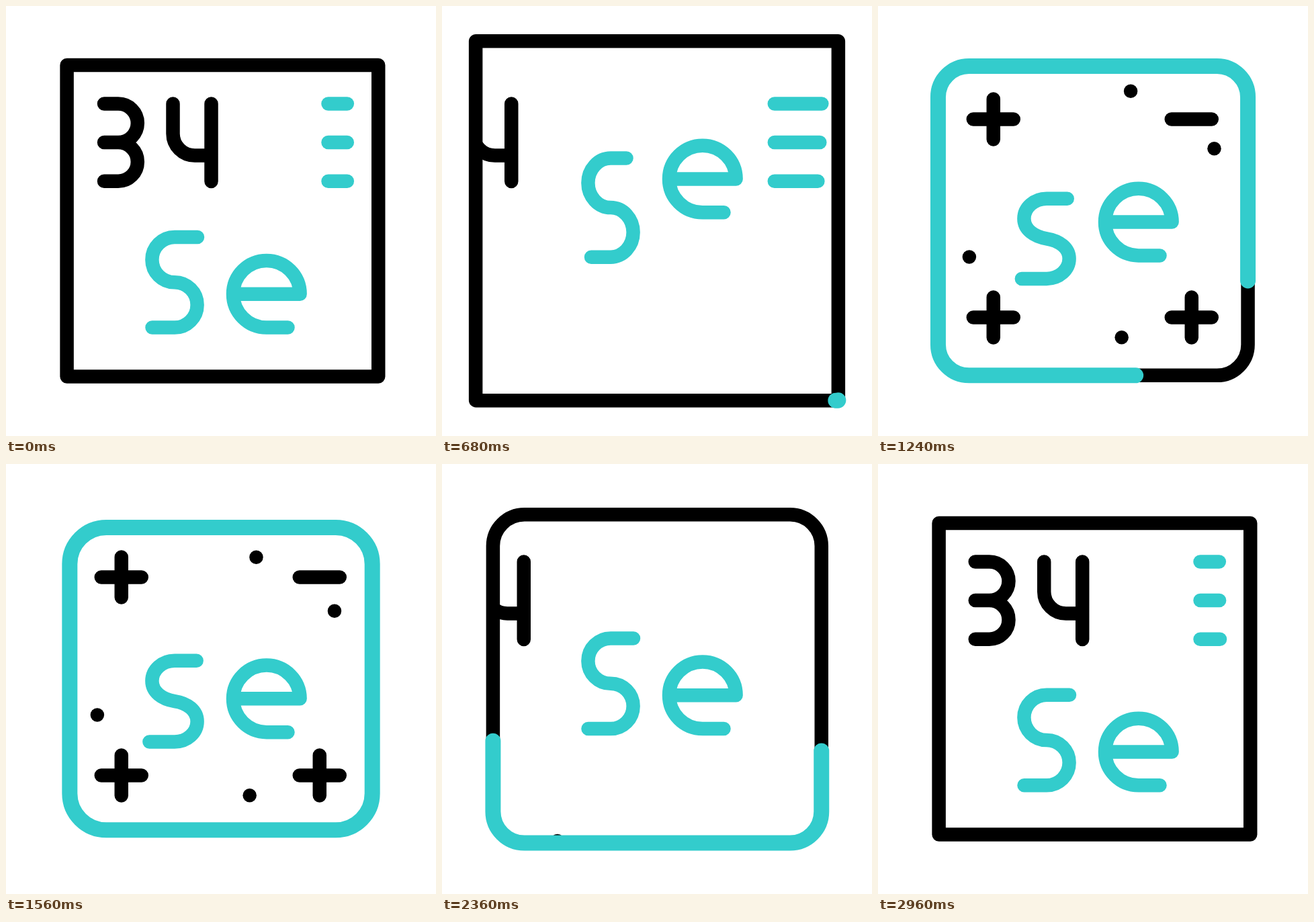
An HTML page with a canvas for the animation above (3 s loop, 640 px wide and 640 px high).

```html
<!DOCTYPE html>
<html>
<head>
<meta charset="utf-8">
<style>
  html, body { margin: 0; width: 100%; height: 100%; overflow: hidden; background: #fff; }
  canvas { display: block; width: 640px; height: 640px; }
</style>
</head>
<body>
<canvas id="stage" width="640" height="640"></canvas>
<script>
const ctx = document.getElementById('stage').getContext('2d');
const BLACK = '#000', TEAL = '#33cccc', LINE = 20.5;
const LOOP = 3000, STEP = 40;

// Eased progress from a to b, clamped to 0..1
const ease = (t, a, b) => {
  const u = Math.min(1, Math.max(0, (t - a) / (b - a)));
  return u * u * (3 - 2 * u);
};

// Rises from a to b, falls back from c to d
const pulse = (t, a, b, c, d) => ease(t, a, b) - ease(t, c, d);

function stroke(path, color, width = LINE) {
  ctx.strokeStyle = color;
  ctx.lineWidth = width;
  ctx.stroke(new Path2D(path));
}

function strokeAt(x, y, path, color) {
  ctx.save();
  ctx.translate(x, y);
  stroke(path, color);
  ctx.restore();
}

// The frame swells, shrinks into a rounded square, swells again and returns
function boxAt(t) {
  const swell = pulse(t, 120, 640, 640, 1440);
  const radius = 54.5 * pulse(t, 640, 1440, 2230, 2780);
  const half = 231.8 + 38.4 * swell - 8.6 * pulse(t, 640, 1440, 1440, 2110)
             + 14.7 * pulse(t, 1440, 2110, 2230, 2780);
  const cx = 322.4 - 2.4 * pulse(t, 120, 640, 2230, 2780), cy = 319.7;
  const l = cx - half, r = cx + half;
  const top = cy - half + 2.4 * swell, b = cy + half - 2.4 * swell;
  const arc = (x, y) => `A${radius} ${radius} 0 0 1 ${x} ${y}`;
  return {
    path: `M${r} ${b - radius}${arc(r - radius, b)}H${l + radius}${arc(l, b - radius)}` +
          `V${top + radius}${arc(l + radius, top)}H${r - radius}${arc(r, top + radius)}Z`,
    length: 2 * (r - l + b - top) - (8 - 2 * Math.PI) * radius
  };
}

// A teal line grows around the frame while drifting clockwise, then its tail catches up
function drawFrame(t, box) {
  stroke(box.path, BLACK);
  const eaten = ease(t, 1880, 2720);
  const part = ease(t, 660, 1440) - eaten;
  if (part <= 0) return;
  if (part < 1) {
    const drift = 150 / 360 * Math.max(0, (t - 720) / 1980);
    ctx.setLineDash([part * box.length, (1 - part) * box.length]);
    ctx.lineDashOffset = -(drift + eaten) * box.length;
  }
  stroke(box.path, TEAL, 23);
  ctx.setLineDash([]);
}

function drawNumber(t) {
  const x = -236 * pulse(t, 120, 855, 2080, 3000);
  const bowl = 'h21a28.8 28.8 0 0 1 0 57.6h-21';
  strokeAt(x, 0, `M146 145.5${bowl}M146 203.1${bowl}`, BLACK);
  strokeAt(x, 0, 'M248.5 145.5V190A32.5 32.5 0 0 0 281 222.5H305.5M305.5 145.5V261', BLACK);
}

function drawBars(t) {
  const left = 479.5 + 100 * pulse(t, 575, 1000, 2300, 2750);
  for (let i = 0; i < 3; i++) {
    const delay = 16 * i, end = 2960 + 20 * i;
    const right = 507.8 + 130 * pulse(t, 200 + delay, 1240 + delay, end - 700, end);
    if (right > left) stroke(`M${left} ${145.5 + 57.6 * i}H${right}`, TEAL);
  }
}

function drawSigns(t) {
  const away = (start, end) => 1 - pulse(t, start, end, 2040, 2480);
  const minus = 'M-30 0H30', plus = minus + 'M0 -30V30', dot = 'M0 0H.01';
  ctx.save();
  ctx.translate(319.25, 316);
  // Corner signs slide in as a pinwheel
  const corner = (sx, sy, dx, dy, end, shape) => {
    const shift = 156 * away(680, end);
    strokeAt(147.5 * sx + dx * shift, 147.4 * sy + dy * shift, shape, BLACK);
  };
  corner(-1, -1, -1, 0, 1200, plus);
  corner(1, -1, 0, -1, 1150, minus);
  corner(1, 1, 1, 0, 1080, plus);
  corner(-1, 1, 0, 1, 1080, plus);
  // Dots fly in along rays from the centre
  const spark = (x, y, start) => {
    const scale = 1 + .6 * away(start, start + 430);
    strokeAt(x * scale, y * scale, dot, BLACK);
  };
  spark(-183.4, 57.5, 680);
  spark(43.4, 177.3, 680);
  spark(53.2, -177.2, 900);
  spark(169.7, -97.2, 900);
  ctx.restore();
}

function drawLetters(t) {
  // Height of a hop: up to a peak, down to a landing, settle, then back to rest
  const hop = (peakTime, peak, landing, settled) =>
    peak * pulse(t, 120, peakTime, peakTime, 1440) +
    landing * pulse(t, peakTime, 1440, 1440, settled) +
    84.5 * pulse(t, 1440, settled, 2370, 2980);
  const top = 344 - hop(800, 128, 36, 1760);
  const bottom = 478.5 - hop(840, 120, 56, 1760);
  const stretch = pulse(t, 120, 680, 680, 1440);
  const squash = pulse(t, 840, 1440, 1440, 1760);
  const tipTop = 285 - 10.5 * stretch - 2 * squash;
  const tipBottom = 217.5 + 4.5 * stretch - 6 * squash;

  const mid = (top + bottom) / 2, ry = (bottom - top) / 4, tilt = 4 * squash;
  const kx = 18.5, ky = ry * .552;
  stroke(`M${tipTop} ${top}H251` +
    `C${251 - kx} ${top} 217.4 ${top + ry - ky} 217.4 ${top + ry}` +
    `S${251 - kx} ${mid - tilt} 251 ${mid}` +
    `S284.6 ${bottom - ry - ky} 284.6 ${bottom - ry}` +
    `S${251 + kx} ${bottom} 251 ${bottom}H${tipBottom}`, TEAL);

  strokeAt(0, -hop(840, 196, 76, 1720),
    'M338 428.7H437.6A49.8 49.8 0 1 0 387.8 478.5H419.5', TEAL);
}

function draw(now) {
  const t = Math.floor(now % LOOP / STEP) * STEP;
  const box = boxAt(t);
  ctx.clearRect(0, 0, 640, 640);
  ctx.lineCap = ctx.lineJoin = 'round';
  ctx.save();
  ctx.clip(new Path2D(box.path));
  drawNumber(t);
  drawBars(t);
  drawSigns(t);
  ctx.restore();
  drawLetters(t);
  drawFrame(t, box);
}

const begin = performance.now();
function tick() {
  draw(performance.now() - begin);
  requestAnimationFrame(tick);
}
tick();
</script>
</body>
</html>
```
